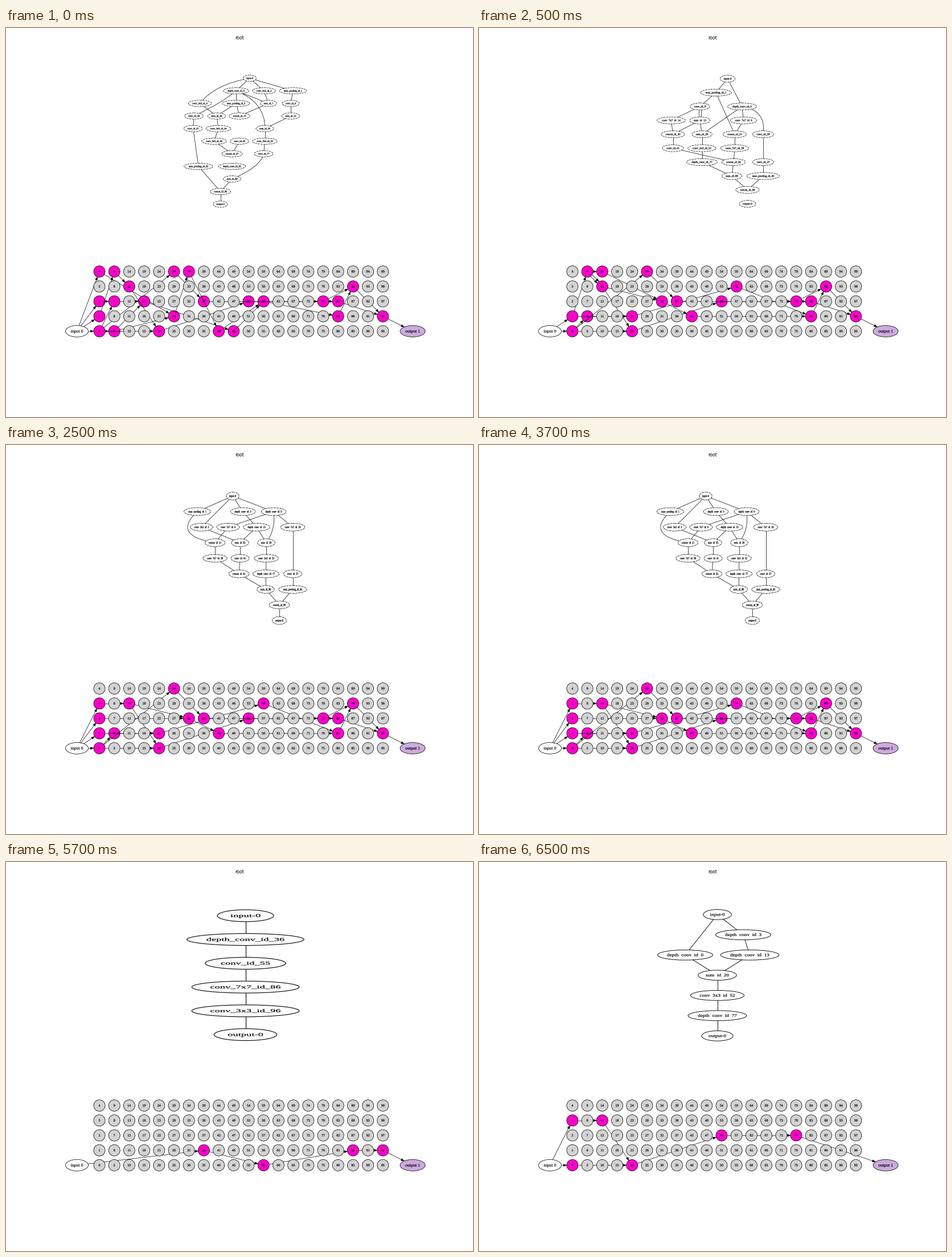
A matplotlib script for the animation above (8000 ms loop, 820 by 683 pixels).

```python
import itertools
import math

import matplotlib.pyplot as plt
from matplotlib.animation import FuncAnimation
from matplotlib.patches import Ellipse, PathPatch, Polygon
from matplotlib.path import Path
from matplotlib.textpath import TextPath
from matplotlib.transforms import Affine2D

W, H, DPI = 820, 683, 64  # a power of two keeps the pixel size exact
PX = 72 / DPI
IN, OUT = -1, 100
PINK, GREY, LILAC = "#ff00cc", "#d3d3d3", "#ccaadd"
SERIF = {"family": "Liberation Serif"}

fig = plt.figure(figsize=(W / DPI, H / DPI), dpi=DPI, facecolor="white")
ax = fig.add_axes([0, 0, 1, 1])
ax.set_xlim(0, W)
ax.set_ylim(H, 0)
ax.axis("off")
ax.text(409.7, 20.4, "root", ha="center", va="baseline", family="DejaVu Sans",
        fontsize=7.9 * PX)

# Links shared by the two similar networks.
TAIL = {20: [52], 21: [58], 29: [37], 32: [41], 37: [82], 41: [81], 52: [77],
        58: [81], 77: [88], 81: [88], 82: [96], 88: [96], 96: [OUT]}

# Each network: layout scale, top row, rows of (kind, id, x), links, and
# optional control points of bent links or links that are not visible.
SCENES = [
    dict(
        scale=(.305, .307), top=88.2, dash=(5, 1.6), weight=.7,
        rows=[
            [("input", IN, 428)],
            [("depth_conv", 0, 404), ("conv_3x3", 2, 453), ("max_pooling", 1, 504)],
            [("conv_3x3", 4, 340.5), ("max_pooling", 5, 404), ("sum", 7, 461),
             ("conv", 9, 500)],
            [("conv", 29, 330), ("sum", 26, 370), ("concat", 17, 410), ("sum", 13, 500)],
            [("conv", 37, 328.5), ("conv_3x3", 34, 373), ("sum", 20, 454.5)],
            [("conv_3x3", 40, 365.5), ("conv", 45, 410), ("conv_3x3", 52, 454.5)],
            [("concat", 57, 397), ("conv", 77, 452.5)],
            [("max_pooling", 82, 338), ("depth_conv", 81, 397)],
            [("sum", 88, 397)],
            [("concat", 96, 376.5)],
            [("output", OUT, 376.5)],
        ],
        links={IN: [0, 1, 2, 4], 0: [5, 7, 29, 20], 1: [9], 2: [7], 4: [26],
               5: [26, 17], 7: [17], 9: [13], 13: [20], 17: [45], 20: [52],
               26: [34], 29: [37], 34: [40], 37: [82], 40: [57], 45: [57],
               52: [77], 57: [81], 77: [88], 81: [88], 82: [96], 88: [96],
               96: [OUT]},
        bends={(IN, 4): (366, 99), (0, 29): (382, 130), (0, 20): (456, 131),
               (77, 88): (447, 244)},
        hidden={(17, 45), (57, 81), (81, 88)},
    ),
    dict(
        scale=(.347, .339), top=89, dash=(5, 1.6), weight=.7, plain_rows={3},
        rows=[
            [("input", IN, 436.5)],
            [("max_pooling", 1, 416)],
            [("conv", 9, 388), ("depth_conv", 0, 462)],
            [("conv_7x7", 14, 337.5), ("sum", 13, 388), ("conv_7x7", 6, 464.5)],
            [("concat", 32, 340.5), ("sum", 20, 391.5), ("concat", 21, 449),
             ("conv", 29, 499)],
            [("conv", 41, 340.5), ("conv_3x3", 52, 391.5), ("conv_7x7", 58, 449)],
            [("depth_conv", 77, 391.5), ("concat", 81, 447), ("conv", 37, 499)],
            [("sum", 88, 444), ("max_pooling", 82, 499)],
            [("concat", 96, 471.5)],
            [("output", OUT, 471.5)],
        ],
        links={IN: [0, 1], 0: [6, 20, 29], 1: [9, 21], 6: [21], 9: [13, 13, 14],
               13: [20, 32], 14: [32], **TAIL},
        bends={(0, 29): (505, 144)},
        hidden={(96, OUT)},
    ),
    dict(
        scale=(.298, .3795), top=89.6, dash=(6, 1.2), weight=.7,
        plain_rows=set(range(6)),
        rows=[
            [("input", IN, 398)],
            [("max_pooling", 1, 336), ("depth_conv", 3, 416), ("depth_conv", 0, 470)],
            [("conv_3x3", 2, 343.5), ("conv_7x7", 6, 390), ("depth_conv", 13, 440),
             ("conv_7x7", 29, 503.5)],
            [("concat", 21, 367), ("sum", 32, 411), ("sum", 20, 457)],
            [("conv_7x7", 58, 367), ("conv", 41, 411), ("conv_3x3", 52, 457)],
            [("concat", 81, 409), ("depth_conv", 77, 456.5), ("conv", 37, 503.5)],
            [("sum", 88, 456), ("max_pooling", 82, 503.5)],
            [("concat", 96, 480)],
            [("output", OUT, 480)],
        ],
        links={IN: [0, 1, 2, 3], 0: [6, 20, 29], 1: [21], 2: [32], 3: [13],
               6: [21], 13: [20, 32], **TAIL},
        bends={(1, 21): (290, 159), (0, 20): (474, 148)},
    ),
    dict(
        scale=(1.32, .58), top=94.3, weight=1.1,
        rows=[[("input", IN, 420.5)], [("depth_conv", 36, 420.5)],
              [("conv", 55, 420.5)], [("conv_7x7", 86, 420.5)],
              [("conv_3x3", 96, 420.5)], [("output", OUT, 420.5)]],
        links={IN: [36], 36: [55], 55: [86], 86: [96], 96: [OUT]},
    ),
    dict(
        scale=(.66, .493), top=92.3, weight=.9, plain_rows=set(range(7)),
        rows=[[("input", IN, 418.5)], [("depth_conv", 3, 464)],
              [("depth_conv", 0, 362), ("depth_conv", 13, 475.5)],
              [("sum", 20, 418.5)], [("conv_3x3", 52, 418.5)],
              [("depth_conv", 77, 418.5)], [("output", OUT, 418.5)]],
        links={IN: [0, 3], 0: [20], 3: [13], 13: [20], 20: [52], 52: [77],
               77: [OUT]},
    ),
]


def text_path(label):
    return TextPath((0, 0), label, size=14, prop=SERIF)


def put_text(add, label, x, y, sx, sy):
    glyphs = text_path(label)
    box = glyphs.get_extents()
    place = (Affine2D().translate(-(box.x0 + box.x1) / 2, -4.2)
             .scale(sx, -sy).translate(x, y))
    add(PathPatch(place.transform_path(glyphs), facecolor="black",
                  edgecolor="black", lw=.2 * PX))


def put_path(add, points, width):
    step = Path.LINETO if len(points) == 2 else Path.CURVE3
    codes = [Path.MOVETO] + [step] * (len(points) - 1)
    add(PathPatch(Path(points, codes), fill=False, edgecolor="black", lw=width * PX))


def pairs(links):
    return [(a, b) for a, heads in links.items() for b in heads]


def twin_shift(a, b, links):
    """Sideways offsets for the parallel links between two nodes."""
    count = links[a].count(b)
    return [4 * (i - (count - 1) / 2) for i in range(count)]


def draw_network(add, scale, top, rows, links, weight, dash=None,
                 bends={}, hidden=(), plain_rows=()):
    sx, sy = scale
    place = {node: (x, top + 72 * sy * r)
             for r, row in enumerate(rows) for _, node, x in row}
    for a, b in dict.fromkeys(pairs(links)):
        if (a, b) in hidden:
            continue
        bend = [bends[a, b]] if (a, b) in bends else []
        for dx in twin_shift(a, b, links):
            ends = [(x + dx, y) for x, y in (place[a], place[b])]
            put_path(add, [ends[0], *bend, ends[1]], weight)
    for r, row in enumerate(rows):
        for kind, node, x in row:
            y = place[node][1]
            label = f"{kind}-0" if node in (IN, OUT) else f"{kind}_id_{node}"
            width = 1.267 * (text_path(label).get_extents().width + 19.6)
            add(Ellipse((x, y), width * sx, 36 * sy, facecolor="white",
                        edgecolor="black", lw=weight * PX,
                        ls=(0, dash) if dash else "-"))
            if r in plain_rows:
                label = label.replace("_", "  ")
            put_text(add, label, x, y, sx, sy)


def grid_place(node):
    if node == IN:
        return 124.5, 532.4
    if node == OUT:
        return 714, 532.4
    return 164 + 26.2 * (node // 5), 532.4 - 26.2 * (node % 5)


def half_width(node):
    return {IN: 20, OUT: 22}.get(node, 10)


def put_grid_node(add, node, used):
    x, y = grid_place(node)
    color = {IN: "white", OUT: LILAC}.get(node, PINK if node in used else GREY)
    add(Ellipse((x, y), 2 * half_width(node), 20, facecolor=color,
                edgecolor="black", lw=.75 * PX))
    if node in (IN, OUT):
        put_text(add, "input 0" if node == IN else "output 1", x, y, .56, .5)
    else:
        put_text(add, str(node), x, y, .43, .42)


def put_arrow(add, a, b, shift):
    (xa, ya), (xb, yb) = grid_place(a), grid_place(b)
    dist = math.hypot(xb - xa, yb - ya)
    ux, uy = (xb - xa) / dist, (yb - ya) / dist

    def edge(node):
        return 1 / math.hypot(ux / half_width(node), uy / 10)

    def at(along, side=0):
        side += shift
        return xa + ux * along - uy * side, ya + uy * along + ux * side

    tip = dist - edge(b)
    put_path(add, [at(edge(a)), at(tip - 5.6)], .7)
    add(Polygon([at(tip), at(tip - 5.6, 2), at(tip - 5.6, -2)],
                facecolor="black", edgecolor="black", lw=.5 * PX))


def draw_grid(add, links):
    """Draw nodes in order, each followed by its links; later nodes cover them."""
    used = set(itertools.chain(links, *links.values()))
    drawn = set()

    def show(node):
        if node not in drawn:
            drawn.add(node)
            put_grid_node(add, node, used)

    for node in range(IN, OUT + 1):
        show(node)
        for head in dict.fromkeys(links.get(node, [])):
            show(head)
            for shift in twin_shift(node, head, links):
                put_arrow(add, node, head, shift)


def build(scene):
    artists = []

    def add(patch):
        artists.append(ax.add_patch(patch))

    draw_network(add, **scene)
    draw_grid(add, scene["links"])
    return artists


groups = [build(scene) for scene in SCENES]


def update(frame):
    # Half-second steps: the first network lasts one, the others four.
    current = (frame + 3) // 4
    for i, group in enumerate(groups):
        for artist in group:
            artist.set_visible(i == current)
    return []


anim = FuncAnimation(fig, update, frames=16, interval=500, repeat=True,
                     init_func=lambda: update(0), blit=False)
plt.show()
```
